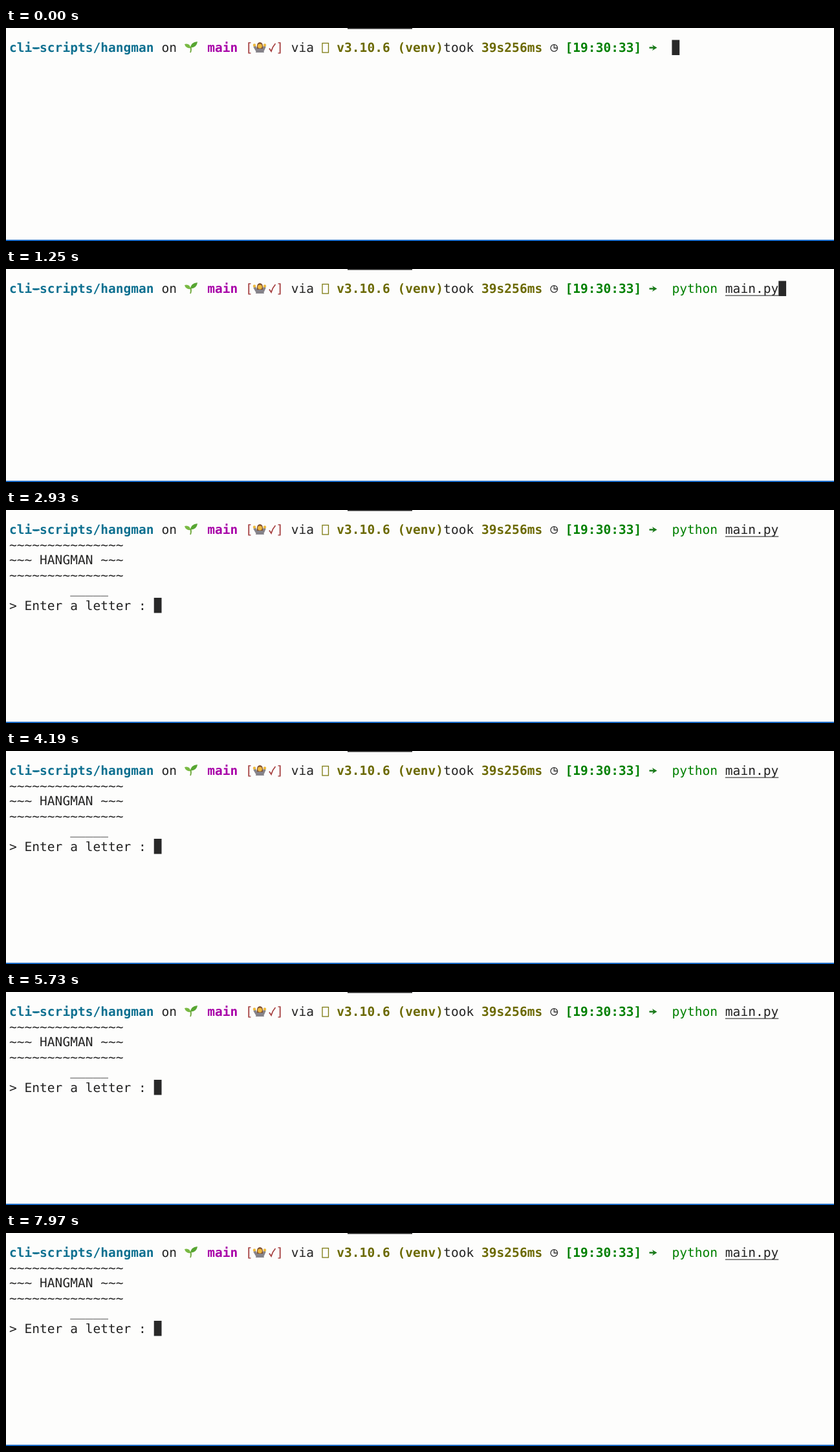
Write an HTML page that moves like this. It is 1280x330 px and loops after 8000 ms.

```html
<!DOCTYPE html>
<html lang="en">
<head>
<meta charset="utf-8">
<title>Hangman in the terminal</title>
<style>
html, body { margin: 0; width: 100%; height: 100%; overflow: hidden; background: #fdfdfc; }
svg { display: block; }
text { font: 19.56px "DejaVu Sans Mono", "Liberation Mono", monospace; fill: #222; white-space: pre; text-rendering: geometricPrecision; }
.bold { font-weight: bold; }
</style>
</head>
<body>
<svg id="stage" width="1280" height="330" viewBox="0 0 1280 330">
  <rect x="528" width="100" height="1.5" fill="#222"/>
  <rect y="328" width="1280" height="2" fill="#1c6ac4"/>
  <g id="prompt"></g>
  <rect x="41" y="29.9" width="10.8" height="2.4" fill="#0e7090"/>

  <!-- seedling -->
  <path d="M285 38Q287 33 285 29" fill="none" stroke="#6aa534" stroke-width="1.8"/>
  <path d="M285.500 30.500Q285 22 296 21Q295 30 285.500 30.500Z" fill="#57a632"/>
  <path d="M285.500 31Q278 32 276 25Q284 23 285.500 31Z" fill="#79b943"/>

  <!-- shrugging figure -->
  <path d="M384 28L388 35M400 28L397 35" stroke="#85838a" stroke-width="4"/>
  <path d="M386 38Q387 31 392 31Q398 31 399 38Z" fill="#85838a"/>
  <path d="M388 32Q387 22 392.500 22Q398 22 397 32Z" fill="#80502e"/>
  <circle cx="392.500" cy="28" r="3.400" fill="#edb93f"/>
  <circle cx="384" cy="26.500" r="2.200" fill="#edb93f"/>
  <circle cx="400" cy="26.500" r="2.200" fill="#edb93f"/>

  <!-- check mark, missing glyph, clock, arrow -->
  <path d="M407 31.500L410 36Q412 29 416.500 24" fill="none" stroke="#a33c3c" stroke-width="1.7"/>
  <rect x="489" y="23.500" width="9.500" height="14.500" fill="none" stroke="#7d7b12" stroke-width="1.3"/>
  <g fill="none" stroke="#333" stroke-width="1.3">
    <circle cx="847.300" cy="31" r="5.300"/>
    <path d="M847.300 25.700V31H852.600"/>
  </g>
  <path d="M994.500 29.300H1000.500L999 26L1006.500 30.500L999 35L1000.500 31.700H994.500Z" fill="#1b7a1b"/>

  <g id="command"></g>
  <path id="underline" stroke="#444" stroke-width="1.2"/>
  <g id="output"></g>
  <rect id="cursor" width="11.800" height="23.500" fill="#282828"/>
</svg>
<script>
const CELL = 11.775, ROW = 23.5, LOOP = 8000;
const TYPE_START = 320, KEY = 60, ENTER = 2000, PRINT = 2470;
const get = id => document.getElementById(id);
const colX = col => 5 + col * CELL;

function put(parent, str, col, row, color = "#222", bold = false, dy = 0) {
  const el = document.createElementNS("http://www.w3.org/2000/svg", "text");
  el.textContent = str;
  el.setAttribute("x", colX(col));
  el.setAttribute("y", 37.2 + row * ROW + dy);
  el.style.fill = color;
  if (bold) el.classList.add("bold");
  get(parent).append(el);
  return el;
}

const olive = "#6b6900", green = "#008000", red = "#a33c3c";
[
  ["cli-scripts/hangman", 0, "#0e7090", true],
  ["on", 20],
  ["main", 26, "#a800a8", true],
  ["[", 31, red],
  ["]", 35, red],
  ["via", 37],
  ["v3.10.6 (venv)", 43, olive, true],
  ["took", 57],
  ["39s256ms", 62, olive, true],
  ["[19:30:33]", 73, green, true]
].forEach(([str, col, color, bold]) => put("prompt", str, col, 0, color, bold));

const program = put("command", "", 87, 0, green);
const file = put("command", "", 94, 0);

const wave = "~".repeat(15);
[wave, "~~~ HANGMAN ~~~", wave].forEach((line, i) => put("output", line, 0, i + 1));
put("output", "_____", 8, 4, "#222", false, -2.3);
put("output", "> Enter a letter : ", 0, 5);

function draw(t) {
  const typed = Math.max(0, Math.min(14, Math.floor((t - TYPE_START) / KEY)));
  const command = "python main.py".slice(0, typed);
  program.textContent = command.slice(0, 6);
  file.textContent = command.slice(7);
  get("underline").setAttribute("d", typed > 7 ? `M${colX(94)} 41.200H${colX(87 + typed)}` : "");
  get("output").style.display = t < PRINT ? "none" : "";

  const [col, row] = t < ENTER ? [87 + typed, 0] : t < PRINT ? [0, 1] : [19, 5];
  get("cursor").setAttribute("x", colX(col));
  get("cursor").setAttribute("y", 18.5 + row * ROW);
}

const start = performance.now();
function tick() {
  draw((performance.now() - start) % LOOP);
  requestAnimationFrame(tick);
}
tick();
</script>
</body>
</html>
```
